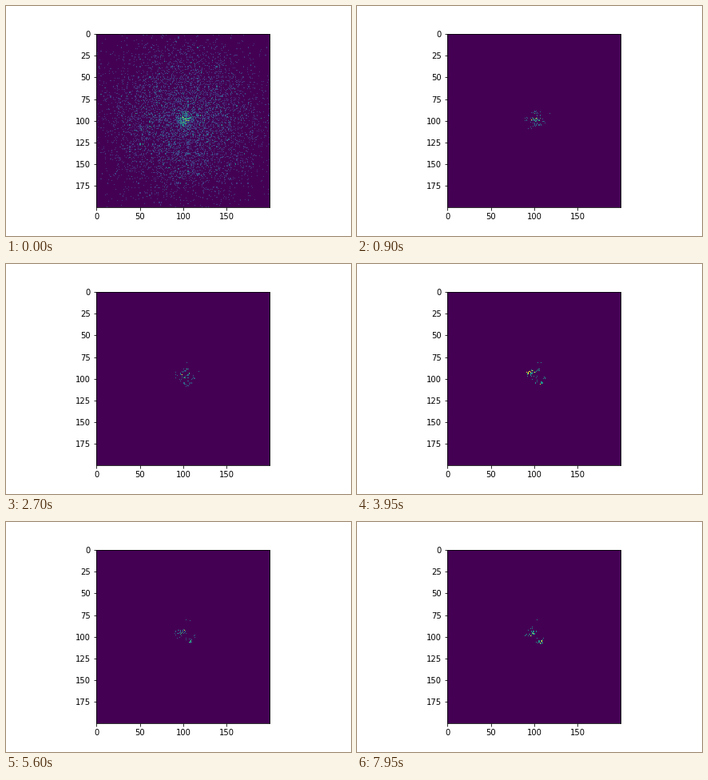
A matplotlib script for the animation above (8000 ms loop, 432 by 288 pixels).

```python
import numpy as np
import matplotlib.pyplot as plt
from matplotlib.animation import FuncAnimation

SIZE = 200
FRAMES, STEP = 160, 50
CENTRE = np.array([101, 99.5])
REACH = 12.5          # survivors stay within this distance of the centre
TURNOVER = 0.06       # share of the population replaced in each step

# single cells away from the cluster: x, y, first and last step
STRAYS = [(117, 92, 0, 66), (104, 82, 46, 100), (107, 82, 66, 118),
          (103, 81, 100, FRAMES)]


def population(k):
    return int(42 + 50 * np.exp(-k / 50) + 310 * np.exp(-k / 4))


def evolve():
    """Points die at random and are replaced by neighbours of others."""
    rng = np.random.default_rng(8)
    pts = np.rint(rng.normal(CENTRE - (0, 1), 5, (population(0), 2))).astype(int)
    history = [pts]
    for k in range(1, FRAMES):
        if k == 1:
            pts = pts[np.hypot(*(pts - CENTRE).T) < REACH]
        n = min(len(pts), population(k))
        pts = pts[rng.permutation(len(pts))[:n]]
        parents = pts[rng.integers(n, size=n)]
        children = parents + rng.integers(-2, 3, (n, 2))
        born = rng.random(n) < TURNOVER
        born &= np.hypot(*(children - CENTRE).T) < REACH
        pts = np.where(born[:, None], children, pts)
        history.append(pts)
    return history


def make_cloud():
    """Wide cloud around the cluster, with the step at which each point dies."""
    rng = np.random.default_rng(11)
    pts = np.rint(rng.normal(100, 47, (6500, 2))).astype(int)
    inside = ((pts >= 0) & (pts < SIZE)).all(axis=1)
    return pts[inside], rng.geometric(0.6, inside.sum())


history = evolve()
cloud, death = make_cloud()


def field(k):
    strays = [(x, y) for x, y, first, last in STRAYS if first <= k < last]
    pts = np.vstack([history[k], cloud[death > k], strays]).astype(int)
    grid = np.zeros((SIZE, SIZE))
    np.add.at(grid, (pts[:, 1], pts[:, 0]), 1)
    return grid


plt.rcParams.update({"font.family": "DejaVu Sans", "font.size": 10})
fig, ax = plt.subplots(figsize=(6, 4), dpi=72, facecolor="white")
fig.subplots_adjust(left=0.125, right=0.9, bottom=0.125, top=0.88)
img = ax.imshow(field(0), cmap="viridis", interpolation="nearest")
ax.set_xticks(range(0, SIZE, 50))
ax.set_yticks(range(0, SIZE, 25))


def update(k):
    grid = field(k)
    img.set_data(grid)
    img.set_clim(0, grid.max())
    return [img]


anim = FuncAnimation(fig, update, frames=FRAMES, interval=STEP,
                     repeat=True, repeat_delay=0)
plt.show()
```
